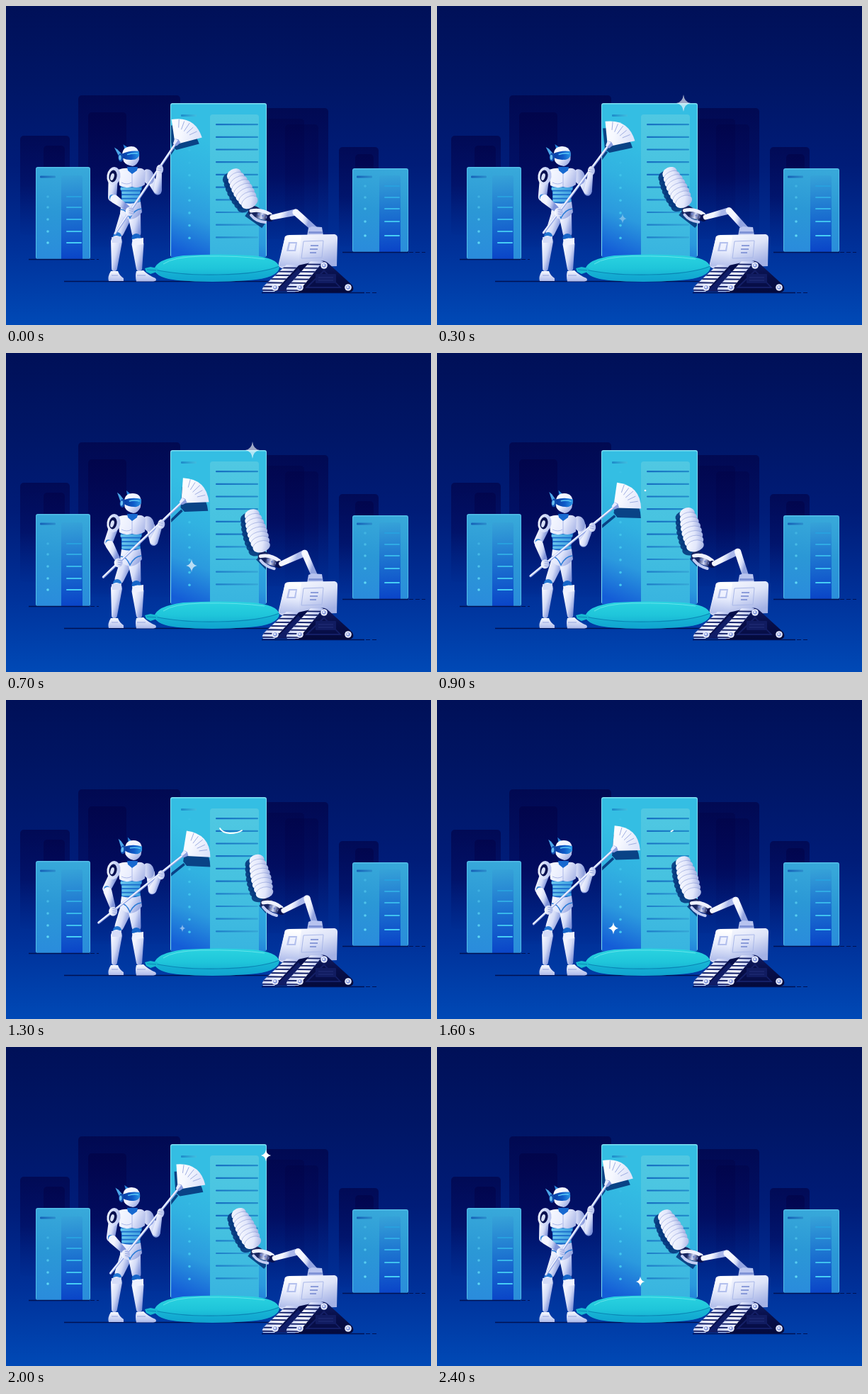
Recreate the animation shown at these times as an HTML page with a canvas. Size 600 by 450 pixels, loop 2500 ms.

```html
<!DOCTYPE html>
<html lang="en">
<head>
<meta charset="utf-8">
<title>Robots cleaning a server</title>
<style>
html, body { margin: 0; width: 100%; height: 100%; overflow: hidden; background: #00135c; }
canvas { display: block; width: 600px; height: 450px; }
</style>
</head>
<body>
<canvas id="stage" width="600" height="450"></canvas>
<script>
const c = document.getElementById('stage').getContext('2d');
const LOOP = 2500, STEP = 100;
const NAVY = '#06104f', WHITE = '#f8faff', LILAC = '#a9b6ea', INK = 'rgba(5,55,125,.9)';

const lerp = (a, b, k) => a + (b - a) * k;
const mix = (a, b, k) => a.map((v, i) => lerp(v, b[i], k));
const ease = k => (1 - Math.cos(Math.PI * Math.max(0, Math.min(1, k)))) / 2;
const span = (t, from, to) => ease((t - from) / (to - from));

function lin(x0, y0, x1, y1, ...cols) {
  const g = c.createLinearGradient(x0, y0, x1, y1);
  cols.forEach((s, i) => g.addColorStop(i / (cols.length - 1), s));
  return g;
}
function box(x, y, w, h, fill, r = 0) {
  c.fillStyle = fill;
  c.beginPath();
  c.roundRect(x, y, w, h, r);
  c.fill();
}
function poly(fill, ...p) {
  c.fillStyle = fill;
  c.beginPath();
  for (let i = 0; i < p.length; i += 2) c.lineTo(p[i], p[i + 1]);
  c.closePath();
  c.fill();
}
function shape(fill, d) {
  c.fillStyle = fill;
  c.fill(new Path2D(d));
}
function curve(color, w, d) {
  c.strokeStyle = color;
  c.lineWidth = w;
  c.stroke(new Path2D(d));
}
function oval(x, y, rx, ry, fill, turn = 0) {
  c.fillStyle = fill;
  c.beginPath();
  c.ellipse(x, y, rx, ry, turn, 0, 7);
  c.fill();
}
function line(color, w, x0, y0, x1, y1) {
  c.strokeStyle = color;
  c.lineWidth = w;
  c.beginPath();
  c.moveTo(x0, y0);
  c.lineTo(x1, y1);
  c.stroke();
}
function clipTower() {
  c.save();
  c.beginPath();
  c.rect(233, 138, 134, 216);
  c.clip();
}
// Tapered capsule with shading across its width
function limb([x0, y0], r0, [x1, y1], r1, light = '#f3f5ff', dark = '#7f93da') {
  const a = Math.atan2(y1 - y0, x1 - x0), h = Math.PI / 2;
  const mx = (x0 + x1) / 2, my = (y0 + y1) / 2, r = Math.max(r0, r1);
  c.fillStyle = lin(mx - r, my - r * .3, mx + r, my + r * .3, light, '#d3dbf7', dark);
  c.beginPath();
  c.arc(x0, y0, r0, a + h, a - h);
  c.arc(x1, y1, r1, a - h, a + h);
  c.closePath();
  c.fill();
}

function backdrop() {
  c.fillStyle = lin(0, 0, 0, 450, '#001058', '#001666', '#001c78', '#003098', '#0049b6');
  c.fillRect(0, 0, 600, 450);
  const far = (x, y, w, h, a) =>
    box(x, y, w, h, lin(0, y, 0, y + h, `rgba(2,0,66,${a})`, `rgba(2,4,82,${a * .8})`, 'rgba(0,25,120,.05)'), 5);
  far(102, 126, 144, 218, .6);
  far(116, 150, 54, 190, .55);
  far(20, 183, 70, 140, .6);
  far(53, 197, 30, 125, .5);
  far(360, 144, 95, 185, .6);
  far(360, 159, 61, 170, .35);
  far(394, 167, 47, 160, .35);
  far(470, 199, 56, 140, .6);
  far(493, 209, 26, 128, .5);
}

function sideTower(x, y, w, h, panel, dotX, rows) {
  box(x, y, w, h, '#53bee8', 3);
  box(x + 1, y + 1.5, w - 2, h - 1.5, lin(x + w * .6, y, x + w * .4, y + h, '#38a9da', '#2b98d6', '#2a8cdc'), 2);
  box(panel, 239, 30, y + h - 239, lin(panel, 239, panel + 8, y + h, '#36a3d8', '#1c72d0', '#0a45c8'), [3, 3, 0, 0]);
  box(x + 6, 239.5, 22, 3, lin(x + 6, 0, x + 28, 0, '#1560b6', '#2b8dcc'), 1);
  rows.forEach((ry, i) => {
    const k = i / 4;
    box(panel + 7, ry - 1, 22, 2, `rgb(${lerp(40, 70, k)},${lerp(160, 205, k)},${lerp(222, 245, k)})`, 1);
    oval(dotX, ry, 1.8, 1.8, `rgba(95,215,245,${lerp(.35, 1, k)})`);
  });
}

function mainTower() {
  box(232, 137, 136, 217, '#7fe0f2', 3);
  box(233, 138.5, 134, 216, lin(305, 200, 248, 348, '#34bee3', '#31b2e1', '#2b9ade', '#145dd7'), 2);
  box(288, 153, 69, 201, lin(325, 153, 315, 354, '#50c8e2', '#46c2e0', '#38b4e0'), [4, 4, 0, 0]);
  box(247, 153, 22, 3, lin(247, 0, 269, 0, '#1d8bc9', '#40bddf'), 1);
  for (let i = 0; i < 10; i++) {
    const y = 167 + i * 17.7;
    box(296, y - 1, 60, 2.2, lin(296, 0, 356, 0, i < 6 ? '#176fc2' : '#1d7cc8', i < 6 ? '#238dcb' : '#35a6d6'), 1);
    oval(259, y + 1, 1.8, 1.8, `rgba(70,205,240,${i < 4 ? .25 : .4 + i * .06})`);
  }
}

function pillow() {
  shape(lin(0, 351, 0, 389, '#2ad3e0', '#1fc5da', '#12a5d0'),
    'M209 372Q212 357 250 352Q300 349 348 352Q382 355 386 368Q385 384 342 387Q290 391 243 387Q213 384 209 372Z');
  shape('rgba(14,160,206,.4)', 'M211 372Q245 380 300 379Q360 378 386 367Q385 384 342 387Q290 391 243 387Q215 384 211 372Z');
  curve('#0a86b5', 1.2, 'M211 372Q245 380 300 379Q360 378 386 367');
  curve('#62e5ea', 1, 'M222 364Q236 354 275 353Q330 352 365 357');
  poly('#17b9d2', 196, 370, 204, 368, 214, 370, 213, 375, 204, 378, 198, 375);
  curve('#0b87ba', 1, 'M199 372L212 373');
}

function ground() {
  const col = '#021152';
  line(col, 1.3, 82, 388.5, 385, 388.5);
  line(col, 1.3, 32, 357.5, 118, 357.5);
  line(col, 1.3, 475, 347.5, 568, 347.5);
  line(col, 1.3, 361, 404.5, 506, 404.5);
  c.setLineDash([6, 3]);
  line(col, 1.2, 119, 357.5, 131, 357.5);
  line(col, 1.2, 569, 347.5, 592, 347.5);
  line(col, 1.2, 508, 404.5, 523, 404.5);
  c.setLineDash([]);
}

function fan(fill) {
  shape(fill, 'M2 -4L24 -24Q47 0 27 26L2 4Z');
}
// Draws the duster along the x axis from the grip end
function duster([x, y], angle, shadow) {
  c.save();
  c.translate(x, y);
  c.rotate(angle);
  if (shadow) {
    line(INK, 3.6, 0, 0, 155, 0);
    c.translate(154, 0);
    fan(INK);
  } else {
    c.lineCap = 'round';
    line('#8fa3e4', 3.4, 0, 0, 155, 0);
    line('#eef2ff', 2, 0, -.5, 155, -.5);
    c.lineCap = 'butt';
    c.translate(154, 0);
    fan(lin(0, -20, 20, 22, '#ffffff', '#f6f8ff', '#dfe5fa'));
    for (let i = -2; i <= 2; i++) line('#9dace0', .9, 20, i * 4.6, 34 - Math.abs(i) * 2, i * 7.6);
    poly('#8d9fe0', -3, -3, 4, -5, 6, 0, 4, 5, -3, 3);
    poly('#e8ecff', -3, -3, 4, -5, 5, 0, -3, 0);
  }
  c.restore();
}

function legs() {
  // far leg
  limb([170, 294], 9, [160, 319], 6.5);
  oval(157, 325, 6, 6, '#2277d4');
  limb([156, 332], 8, [153, 370], 4);
  poly('#d5dcf7', 149, 326, 163, 325, 162, 334, 150, 334);
  shape(lin(0, 374, 0, 389, WHITE, LILAC), 'M148 374L158 374Q160 380 166 384L166 388L145 388Q143 382 148 374Z');
  // near leg
  limb([181, 294], 9, [184, 320], 6.5);
  oval(184, 327, 6.5, 6, '#1565c9');
  limb([186, 336], 8.5, [188, 370], 4.2);
  poly('#eef1ff', 178, 329, 194, 327, 194, 336, 179, 338);
  shape(lin(0, 373, 0, 389, WHITE, LILAC), 'M184 374L194 373Q201 380 211 384Q214 388 208 388.5L184 388.5Q182 381 184 374Z');
  curve('#8495d8', .8, 'M149 380L158 380M185 380L197 380');
}

function torso() {
  poly('#1a6bcb', 161, 250, 194, 250, 189, 264, 190, 279, 163, 279, 163, 264);
  for (let i = 0; i < 4; i++) {
    const w = 26 + (i < 1 ? 4 : 0);
    box(176.5 - w / 2, 256 + i * 5.5, w, 3.8, lin(162, 0, 190, 0, '#6cc8ee', '#3d9fdf'), 1);
  }
  shape(lin(162, 276, 192, 290, WHITE, '#dfe5fb', '#8fa0de'), 'M163 277Q177 281 190 276L192 291Q185 300 176 301Q166 300 161 292Z');
  curve('#2a7bd7', 1.6, 'M162 287Q170 287 175 299Q181 287 191 286');
  oval(201, 241, 8, 11, lin(193, 0, 209, 0, '#eff2ff', '#8496d8'), -.25);
  shape(lin(158, 232, 200, 252, WHITE, '#e8ecfd', '#9aa9e2'), 'M158 231Q167 228 172 229L178 235L186 229Q194 228 197 234L196 252Q187 258 178 255Q168 258 160 253Z');
  curve('#a3b2e6', .9, 'M178 236L178 255M163 249Q171 253 177 249');
  poly('#1769d0', 171, 227, 186, 227, 185, 232, 178, 237, 172, 232);
  oval(152, 240, 9.5, 13, lin(143, 0, 162, 0, '#eef2ff', '#b5c2f0'), .15);
  oval(151, 240, 5.5, 8.5, NAVY, .15);
  oval(150, 241, 2.5, 5, '#d8e0f9', .3);
}

function head(p) {
  c.save();
  c.translate(lerp(178, 179, p), 227);
  c.rotate(lerp(-.11, .06, p));
  c.translate(-179, -227);
  poly('#4ba6e8', 157, 197, 161, 200, 168, 209, 165, 218);
  poly('#2a86dc', 170, 194, 176, 199, 172, 204);
  shape(lin(168, 200, 191, 222, WHITE, '#eef1ff', '#93a4e0'),
    'M167 211Q167 198 179 198Q190 198 191 209L190 218Q186 226 180 226Q171 224 168 218Z');
  shape(lin(168, 0, 192, 0, '#0a3fa4', '#0e5bc9', '#2c9ae8'), 'M167 207Q179 203 191 206L191 212Q187 218 181 217Q173 217 167 213Z');
  curve('#5cc8f6', 1.5, 'M174 209Q182 207 189 209');
  oval(164.5, 212, 3.6, 6, '#0f4cae', .1);
  oval(163.5, 212, 1.8, 3.6, '#68bdf0', .1);
  c.restore();
}

function cleaner(p) {
  const angle = lerp(-56, -38, p) * Math.PI / 180;
  const grip = mix([154, 321], [130, 314], p);
  const along = d => [grip[0] + Math.cos(angle) * d, grip[1] + Math.sin(angle) * d];
  const low = along(lerp(39, 27, p)), high = along(113);
  const elbowL = mix([150, 270], [142, 266], p), elbowR = mix([214, 261], [206, 269], p);

  clipTower();
  duster([grip[0] + lerp(-4, 0, p), grip[1] + lerp(9, 14, p)], angle, true);
  c.restore();

  legs();
  limb([151, 249], 6.5, elbowL, 6);
  limb([204, 244], 6, elbowR, 5.5);
  torso();
  head(p);
  duster(grip, angle, false);

  oval(...elbowL, 4, 4, '#3a8ade');
  limb(mix(elbowL, low, .12), 6, mix(elbowL, low, .8), 4.2);
  oval(low[0] - 1, low[1] + 1, 6, 6.5, lin(low[0] - 6, 0, low[0] + 6, 0, WHITE, LILAC));
  curve('#8d9edc', .8, `M${low[0] - 2} ${low[1] - 3}l6 1M${low[0] - 2} ${low[1]}l6 1M${low[0] - 2} ${low[1] + 3}l5 1`);
  oval(...elbowR, 4, 4, '#2b79d5');
  limb(mix(elbowR, high, .05), 5.8, mix(elbowR, high, .7), 3.8);
  oval(high[0], high[1] + 3, 5, 6.5, lin(high[0] - 5, 0, high[0] + 5, 0, WHITE, LILAC));
  curve('#8d9edc', .8, `M${high[0] - 4} ${high[1] + 1}l6 1M${high[0] - 4} ${high[1] + 4}l6 1`);
}

function fluff(top, end, fill) {
  const a = Math.atan2(end[1] - top[1], end[0] - top[0]);
  for (let i = 0; i < 8; i++) {
    const k = i / 7, [x, y] = mix(top, end, k);
    const r = 9.5 + 5 * Math.sin(Math.PI * (.08 + k * .72));
    oval(x, y, 8, r, fill || lin(x - 13, y, x + 14, y + 5, '#f7f9ff', '#e2e7fb', '#97a6de'), a);
    if (fill || !i) continue;
    c.strokeStyle = 'rgba(112,131,205,.5)';
    c.lineWidth = .9;
    c.beginPath();
    c.ellipse(x, y, 8, r, a, 2, 4.3);
    c.stroke();
  }
}

function roverArm(p) {
  const top = mix([322, 238], [354, 226], p), end = mix([344, 277], [365, 272], p);
  const wrist = mix([373, 299], [389, 298], p), elbow = mix([409, 291], [425, 280], p);
  const shift = ([x, y]) => [x - 6, y + 5];
  clipTower();
  fluff(shift(top), shift(end), INK);
  line(INK, 13, end[0] - 3, end[1] + 14, wrist[0] - 8, wrist[1] + 9);
  c.restore();

  const claw = mix([350, 290], [367, 287], p);
  limb(claw, 8, wrist, 5, '#17245f', NAVY);
  fluff(top, end);
  c.lineCap = 'round';
  const [x, y] = wrist;
  curve('#eef1ff', 5, `M${claw[0] - 4} ${claw[1] - 1}Q${claw[0] + 10} ${claw[1] - 4} ${x} ${y - 5}`);
  curve('#c3cdf3', 4, `M${claw[0] - 4} ${claw[1] + 5}Q${claw[0] + 3} ${claw[1] + 14} ${x - 7} ${y + 6}`);
  c.lineCap = 'butt';
  for (let i = 0; i < 3; i++) {
    const [dx, dy] = mix(claw, wrist, .3 + i * .25);
    oval(dx, dy + 1, 1.6, 1.6, '#7588cd');
  }
  oval(x, y, 5, 5, NAVY);
  limb([x + 3, y - 1], 3.6, elbow, 4.6, '#f4f6ff', '#a9b7ea');
  limb(elbow, 4.6, [436, 315], 4.4, '#f4f6ff', '#93a4e0');
  oval(...elbow, 2.6, 2.6, '#f8f9ff');
}

function tread(x, y) {
  // Sloping belt: top edge at (x, y), foot 35 px further left
  const w = 18, foot = 403;
  c.save();
  c.beginPath();
  c.moveTo(x, y);
  c.lineTo(x + w, y);
  c.lineTo(x + w - 35, foot);
  c.lineTo(x - 33, foot);
  c.quadraticCurveTo(x - 36, foot - 4, x - 31, foot - 9);
  c.closePath();
  c.clip();
  c.fillStyle = lin(x - 35, 0, x + w, 0, '#c6d0f4', '#f3f5ff', '#aebbec');
  c.fillRect(x - 40, y, 62, 45);
  for (let ty = y + 4; ty < foot; ty += 5.3) line('#0a1761', 1.8, x - 40, ty, x + w, ty + .6);
  c.restore();
}
function wheel(x, y) {
  oval(x, y, 4.8, 4.8, '#e6ebff');
  oval(x, y, 2.8, 2.8, '#8497dc');
  oval(x - .5, y - .5, 1.3, 1.3, '#ffffff');
}

function rover() {
  poly('#b7c3ef', 425, 324, 427, 313, 432, 311, 446, 312, 448, 324);
  box(427, 318, 20, 3, '#8194d7', 1);
  shape(lin(410, 322, 428, 372, '#f9faff', '#dce2f8', '#a3b1e5'),
    'M394 325Q396 323 400 323L464 322Q468 323 468 327L467 367L389 370Q384 368 385 363Z');
  shape(lin(400, 325, 396, 367, '#ffffff', '#e6ebfc', '#b1beeb'), 'M394 325L417 324L413 366L385 367Z');
  poly('#b3c0ed', 399, 333, 411, 333, 409, 346, 396, 346);
  poly('#eef1ff', 401, 335, 409, 335, 407, 344, 399, 344);
  curve('#aab8e9', 1, 'M420 332L448 331L446 355L417 356Z');
  curve('#7185cf', 1.3, 'M430 338L441 338M429 343L440 343M429 348L438 348');

  poly('#040d49', 412, 366, 430, 362, 430, 403, 376, 403);
  tread(396, 365);
  poly('#101d67', 413, 370, 418, 378, 412, 403, 381, 403);
  shape(lin(0, 360, 0, 404, '#101c63', '#070e48', '#040a3c'), 'M441 361Q449 357 455 363L489 394Q493 402 485 404L408 404Z');
  tread(430, 360);
  poly('#141f66', 449, 372, 474, 398, 422, 398);
  poly('#070e48', 449, 375, 470, 396, 427, 396);
  box(437, 378, 29, 13, '#111c61', 1);
  curve('#232f78', 1, 'M441 383L462 383M441 387L462 387');
  wheel(380, 397);
  wheel(415, 397);
  wheel(449, 366);
  wheel(483, 397);
}

function spark(t, x, y, size, from, to) {
  if (t <= from || t >= to) return;
  const k = Math.sin(Math.PI * (t - from) / (to - from));
  const r = size * Math.sqrt(k), w = r * .84, q = r * .11;
  c.globalAlpha = Math.min(1, k * 1.25);
  shape('#ffffff', `M${x} ${y - r}Q${x + q} ${y - q} ${x + w} ${y}Q${x + q} ${y + q} ${x} ${y + r}` +
    `Q${x - q} ${y + q} ${x - w} ${y}Q${x - q} ${y - q} ${x} ${y - r}Z`);
  c.globalAlpha = 1;
}

function shine(t) {
  if (t >= 900 && t < 1000) oval(294, 194, 1.4, 1.2, '#ffffff');
  if (t < 1000 || t >= 1700) return;
  const len = 36, a = len * span(t, 1300, 1700), b = len * span(t, 900, 1300);
  c.lineCap = 'round';
  c.setLineDash([Math.max(.1, b - a), 90]);
  c.lineDashOffset = -a;
  curve('#ffffff', 1.8, 'M302 181Q305 187 316 188Q327 188 333 184');
  c.setLineDash([]);
  c.lineDashOffset = 0;
  c.lineCap = 'butt';
}

function draw(t) {
  backdrop();
  sideTower(42, 227, 77, 130, 78, 59, [269, 284, 301, 318, 334]);
  sideTower(489, 229, 79, 118, 527, 507, [254, 270, 286, 304, 324]);
  mainTower();
  ground();
  pillow();
  cleaner(span(t, 30, 1100) - span(t, 1150, 2450));
  roverArm(span(t, 0, 1000) - span(t, 1300, 2300));
  rover();
  shine(t);
  spark(t, 348, 137, 17, 200, 800);
  spark(t, 262, 300, 12.5, 250, 800);
  spark(t, 287, 331, 6.5, 300, 700);
  spark(t, 249, 322, 8.5, 1200, 2000);
  spark(t, 367, 153, 8.5, 1650, 2350);
  spark(t, 287, 331, 7.5, 2280, 2500);
}

const start = performance.now();
function tick() {
  const t = (performance.now() - start) % LOOP;
  draw(Math.floor(t / STEP) * STEP);
  requestAnimationFrame(tick);
}
tick();
</script>
</body>
</html>
```
